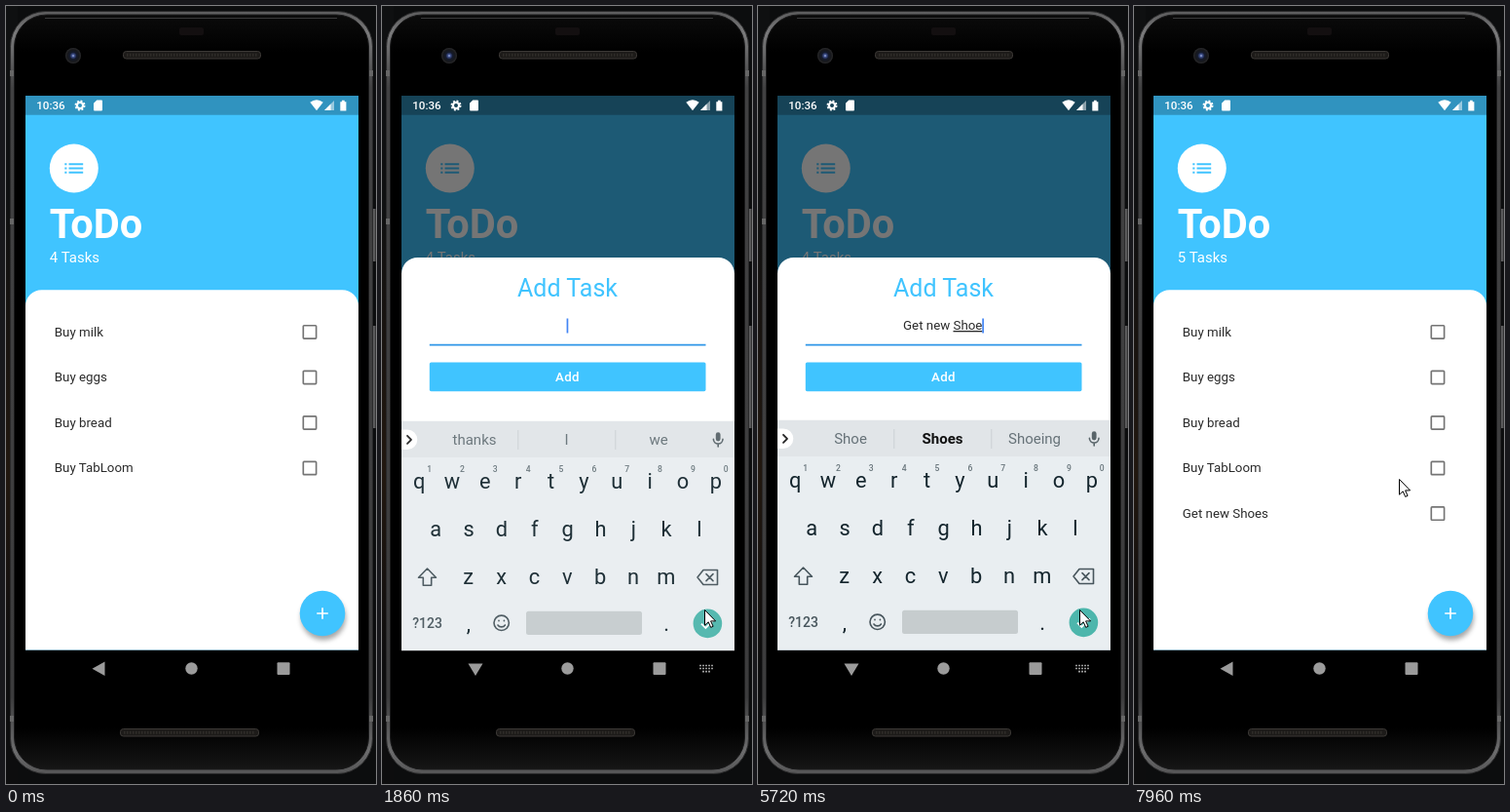
Animation, 380 px wide and 798 px high, one loop 8000 ms. Source, as an HTML page:

```html
<!DOCTYPE html>
<html lang="en">
<head>
<meta charset="utf-8">
<title>ToDo</title>
<style>
  html, body { margin: 0; width: 100%; height: 100%; overflow: hidden; background: #0b0c0d; }
  svg { display: block; width: 380px; height: 798px; font-family: Roboto, sans-serif; }
  text { white-space: pre; }
  .mid { text-anchor: middle; }
  .body { font-size: 13.3px; fill: #2b2b2b; }
  .key { font-size: 21.8px; fill: #14252d; }
  .hint { font-size: 8.6px; font-weight: 500; fill: #68757b; }
  .word { font-size: 15px; fill: #667278; }
  .line { fill: none; stroke: #47555c; stroke-width: 1.6; stroke-linecap: round; stroke-linejoin: round; }
  .u { text-decoration: underline; text-decoration-thickness: 1px; }
</style>
</head>
<body>
<svg viewBox="0 0 380 798">
  <defs>
    <linearGradient id="wall" x2="0" y2="1">
      <stop offset=".25" stop-color="#0f1011"/>
      <stop offset=".6" stop-color="#21170f"/>
      <stop offset=".85" stop-color="#0d0d0e"/>
    </linearGradient>
    <linearGradient id="rim" x2="0" y2="1">
      <stop offset="0" stop-color="#5c5c5d"/>
      <stop offset=".03" stop-color="#7a7a7b"/>
      <stop offset=".1" stop-color="#414142"/>
      <stop offset=".9" stop-color="#3c3c3d"/>
      <stop offset=".97" stop-color="#6c6c6d"/>
      <stop offset="1" stop-color="#555556"/>
    </linearGradient>
    <linearGradient id="glass" x2="0" y2="1">
      <stop offset="0" stop-color="#0b0b0b"/>
      <stop offset=".05" stop-color="#000"/>
      <stop offset=".945" stop-color="#000"/>
      <stop offset="1" stop-color="#161616"/>
    </linearGradient>
    <radialGradient id="lens">
      <stop offset="0" stop-color="#a9b8e6"/>
      <stop offset=".2" stop-color="#3b4c86"/>
      <stop offset=".45" stop-color="#141a2c"/>
      <stop offset=".75" stop-color="#17181b"/>
      <stop offset="1" stop-color="#2c2c2e"/>
    </radialGradient>
    <filter id="soft" x="-40%" y="-40%" width="180%" height="180%"><feGaussianBlur stdDeviation="2.4"/></filter>
    <clipPath id="screen"><path d="M20 92H362V660.5H20z"/></clipPath>
  </defs>

  <!-- phone -->
  <path fill="#0c0d0e" d="M0 0H380V798H0z"/>
  <path fill="url(#wall)" d="M0 0H12V798H0z"/>
  <path fill="#5a5a5b" d="M376 208h3.5v54h-3.5zM376 328h3.5v105h-3.5z"/>
  <rect x="4.5" y="5.5" width="372" height="782" rx="36" fill="url(#rim)" stroke="#2a2a2b"/>
  <rect x="8.5" y="9" width="364" height="774" rx="33" fill="url(#glass)" stroke="#1a1a1b"/>
  <path d="M40 12.5H340" stroke="#3a3a3b"/>
  <path d="M4 66h4v6h-4zM373 66h4v6h-4zM4 218h4v6h-4zM4 728h4v6h-4zM373 728h4v6h-4z" fill="#666"/>
  <rect x="178" y="22" width="25" height="8" rx="2" fill="#130f10"/>
  <circle cx="69" cy="51" r="8" fill="url(#lens)"/>
  <g fill="#1d1b19" stroke="#3c3936">
    <rect x="120.5" y="46.5" width="141" height="7.5" rx="3"/>
    <rect x="117.5" y="741.5" width="142" height="7.5" rx="3"/>
  </g>
  <path d="M124 50.3H258M121 745.3H256" stroke="#2f2c29" stroke-width="3" stroke-dasharray="1.5 1.5"/>

  <g clip-path="url(#screen)">
    <!-- list page -->
    <path fill="#40c4ff" d="M20 92H362V661H20z"/>
    <path fill="#3093bf" d="M20 92H362V111.8H20z"/>
    <circle cx="69.8" cy="166.5" r="25" fill="#fff"/>
    <path d="M60.3 162.3h2.1M64.5 162.3H79.2M60.3 166.5h2.1M64.5 166.5H79.2M60.3 170.7h2.1M64.5 170.7H79.2" stroke="#40c4ff" stroke-width="2.1"/>
    <text x="44.8" y="238" font-size="41.6" font-weight="700" fill="#fff">ToDo</text>
    <text id="count" x="44.8" y="263" font-size="15" fill="#fff"></text>
    <path fill="#fff" d="M20 661V307.8a16.6 16.6 0 0 1 16.6-16.6H345.4A16.6 16.6 0 0 1 362 307.8V661z"/>
    <g id="tasks"></g>
    <circle cx="326" cy="627.5" r="23" fill="#000" opacity=".34" filter="url(#soft)"/>
    <circle cx="325" cy="623" r="23.3" fill="#40c4ff"/>
    <path d="M319.2 623h11.6M325 617.2v11.6" stroke="#fff" stroke-width="1.7"/>
    <path id="dim" d="M20 92H362V661H20z"/>

    <!-- status bar -->
    <text x="31.2" y="106.3" font-size="11.65" font-weight="500" fill="#fff">10:36</text>
    <g fill="none" stroke="#fff">
      <circle cx="76" cy="102" r="3.1" stroke-width="2.2"/>
      <circle cx="76" cy="102" r="4.6" stroke-width="1.8" stroke-dasharray="1.9 1.713"/>
    </g>
    <path fill="#fff" d="M93.3 96.5H98a1 1 0 0 1 1 1v9a1 1 0 0 1-1 1h-7a1 1 0 0 1-1-1V99.8zM312.3 98.8Q319 93.8 325.7 98.8L319 107.3zM333.5 100.5V107H327zM343.3 98.2h1.6v-1.4h2.8v1.4h1.7v9.2h-6.1z"/>
    <path fill="#fff" opacity=".5" d="M337 97V107H327z"/>

    <!-- bottom sheet -->
    <g id="sheet">
      <path fill="#fff" d="M20 960V274.6A16.6 16.6 0 0 1 36.6 258H345.4A16.6 16.6 0 0 1 362 274.6V960z"/>
      <text class="mid" x="190.5" y="298" font-size="25" fill="#40c4ff">Add Task</text>
      <text id="field" class="body" y="332"><tspan id="plain"></tspan><tspan id="under" class="u"></tspan></text>
      <rect id="caret" y="320.5" width="1.7" height="15" fill="#4285f4"/>
      <path d="M48.8 347.7H332.5" stroke="#2f96e8" stroke-width="1.7"/>
      <rect x="48.8" y="365.4" width="283.7" height="29.8" rx="1.7" fill="#40c4ff"/>
      <text class="mid" x="190.5" y="385" font-size="13.3" font-weight="500" letter-spacing=".4" fill="#fff">Add</text>
    </g>
  </g>

  <!-- navigation -->
  <g fill="#9b9b9b">
    <path id="back" d="M101.5 672.5V687L88.5 679.7z"/>
    <g id="hide">
      <path d="M88.5 674.5H103.5L96 687z"/>
      <path d="M326 676.5H340M326 679.5H340M329 682.7H337" stroke="#9b9b9b" stroke-width="1.7" stroke-dasharray="2 1"/>
    </g>
    <circle cx="190.5" cy="679.5" r="6.2"/>
    <rect x="278.5" y="673.3" width="13" height="12.7" rx="1"/>
  </g>

  <!-- keyboard -->
  <g id="board">
    <path fill="#e9eef1" d="M20 462H362V660.3H20z"/>
    <path fill="#e1e5e8" d="M20 424.7H362V462H20z"/>
    <path fill="#fff" d="M20 433.5h6a10.3 10.3 0 0 1 0 20.6h-6z"/>
    <path class="line" d="M26 439.8l4 4-4 4" style="stroke:#222;stroke-width:1.8"/>
    <path d="M139.8 434v20M239.8 434v20" stroke="#cbd1d4"/>
    <g id="words"></g>
    <rect x="342.8" y="436.3" width="4.8" height="9.2" rx="2.4" fill="#59656a"/>
    <path class="line" d="M340.4 443.2a4.8 4.8 0 0 0 9.6 0M345.2 448v3" style="stroke:#59656a"/>
    <g id="keys"></g>
    <path class="line" d="M46.5 576l-9 9.3h4.8v8h8.4v-8h4.8z"/>
    <path class="line" d="M330 577.5H344.5V592.5H330L324 585zM333 581.6l7 7M340 581.6l-7 7"/>
    <text class="mid" x="46.5" y="637" font-size="14" font-weight="500" fill="#47555c">?123</text>
    <text class="mid key" x="89" y="640" font-size="19">,</text>
    <circle class="line" cx="122.7" cy="631.8" r="7.7"/>
    <path class="line" d="M119 634a4.2 3.6 0 0 0 7.4 0M120 629.3v.4M125.4 629.3v.4"/>
    <rect x="148" y="619.7" width="119" height="24.4" rx="2.5" fill="#c6ccce"/>
    <text class="mid key" x="292" y="640">.</text>
    <circle cx="334.4" cy="632.4" r="14.8" fill="#4db6ac"/>
    <path d="M328 632.6l4.4 4.3 8.6-8.6" fill="none" stroke="#fff" stroke-width="1.9"/>
  </g>

  <path id="mouse" d="M.5.5V16.2L4.2 12.8 6.7 18.4 9.1 17.3 6.6 11.9H11.6z" fill="#fff" stroke="#000"/>
</svg>
<script>
const LOOP = 8000;
const $ = id => document.getElementById(id);

function make(tag, attrs, parent, content = '') {
  const el = document.createElementNS('http://www.w3.org/2000/svg', tag);
  for (const k in attrs) el.setAttribute(k, attrs[k]);
  el.textContent = content;
  parent.append(el);
  return el;
}

const rows = ['Buy milk', 'Buy eggs', 'Buy bread', 'Buy TabLoom', 'Get new Shoes'].map((name, i) => {
  const y = 334.4 + i * 46.55;
  const g = make('g', {}, $('tasks'));
  make('text', { class: 'body', x: 49.8, y: y + 4.3 }, g, name);
  make('rect', { x: 305.3, y: y - 6.65, width: 13.3, height: 13.3, rx: 0.8,
                 fill: 'none', stroke: '#757575', 'stroke-width': 1.66 }, g);
  return g;
});

[['qwertyuiop', 38.2, 494], ['asdfghjkl', 55.2, 542.5], ['zxcvbnm', 88.7, 592]].forEach(([keys, x, y], r) => {
  [...keys].forEach((c, i) => {
    const cx = x + i * 33.85;
    make('text', { class: 'key mid', x: cx, y }, $('keys'), c);
    if (!r) make('text', { class: 'hint mid', x: cx + 10.4, y: 477.3 }, $('keys'), (i + 1) % 10);
  });
});

const words = [95, 189.5, 284].map(x => make('text', { class: 'word mid', x, y: 449.3 }, $('words')));

// time, finished words, word being typed, suggestions
const typing = [
  [0, '', '', 'thanks,I,we'],
  [3250, '', 'G', 'G,Good,Go'],
  [3360, '', 'Ge', 'Ge,Get,Getting'],
  [3470, '', 'Get', 'Get,Gets,Getting'],
  [3580, '', 'Get', 'Get,Get a,Getting'],
  [3800, 'Get ', '', 'the,a,it'],
  [4020, 'Get ', 'n', 'n,new,no'],
  [4130, 'Get ', 'ne', 'ne,new,next'],
  [4250, 'Get ', 'new', 'new,new ones,new one'],
  [4470, 'Get new ', '', 'ones,one,and'],
  [4930, 'Get new ', 'S', 'S,So,She'],
  [5040, 'Get new ', 'Sh', 'Sh,She,Should'],
  [5260, 'Get new ', 'Sho', 'Sho,Show,Should'],
  [5720, 'Get new ', 'Shoe', 'Shoe,*Shoes,Shoeing'],
  [5850, 'Get new ', 'Shoes', 'Shoes,Shoe,'],
  [7030, 'Get new Shoes', '', 'Shoes,Shoe,']
];

// time, dim, sheet offset, keyboard offset, keyboard opacity
const poses = [
  [0, 0, 420, 0, 0],
  [1740, .3, 150, 28, .5],
  [1860, .54, 0, 1, .95],
  [1980, .54, 0, 0, 1],
  [7030, .315, 285, 4.3, .89],
  [7150, .08, 375, 28, .3],
  [7270, 0, 420, 0, 0]
];

// start, end, steps, target x, target y
const moves = [
  [370, 940, 6, 336, 637],
  [1860, 1860, 1, 331, 619],
  [2330, 2330, 1, 330, 619],
  [6090, 6570, 5, 175, 396],
  [6690, 6810, 2, 206, 377],
  [7390, 7390, 1, 193, 390],
  [7610, 7960, 4, 272, 485]
];

const latest = (list, t) => list.filter(s => s[0] <= t).pop();
const between = (t, a, b) => t >= a && t < b;
const show = (el, on) => { el.style.display = on ? '' : 'none'; };
const shift = (el, x, y) => el.setAttribute('transform', `translate(${x} ${y})`);

function mouseAt(t) {
  let x = 380, y = 716;
  for (const [a, b, n, tx, ty] of moves) {
    if (t < a) break;
    const done = n > 1 ? Math.min(n, Math.floor((t - a) / (b - a) * (n - 1) + 1e-6) + 1) : 1;
    x += (tx - x) * done / n;
    y += (ty - y) * done / n;
  }
  return [Math.round(x), Math.round(y)];
}

let shown;
function drawText(step) {
  if (step === shown) return;
  shown = step;
  const [, before, word, hints] = step;
  $('plain').textContent = before;
  $('under').textContent = word;
  const w = before || word ? $('field').getComputedTextLength() : 0;
  $('field').setAttribute('x', 189.7 - w / 2);
  $('caret').setAttribute('x', 189.6 + w / 2);
  hints.split(',').forEach((h, i) => {
    const bold = h[0] === '*';
    words[i].textContent = bold ? h.slice(1) : h;
    words[i].style.fontWeight = bold ? 700 : 400;
    words[i].style.fill = bold ? '#111' : '';
  });
}

function render(t) {
  const added = t >= 7030;
  $('count').textContent = (added ? 5 : 4) + ' Tasks';
  show(rows[4], added);

  const [, dim, sheetY, boardY, alpha] = latest(poses, t);
  $('dim').style.opacity = dim;
  shift($('sheet'), 0, sheetY);
  shift($('board'), 0, boardY);
  $('board').style.opacity = alpha;

  drawText(latest(typing, t));
  show($('caret'), !added && !between(t, 2330, 2790) && !between(t, 6330, 6810));

  const open = between(t, 1620, 7030);
  show($('hide'), open);
  show($('back'), !open);

  show($('mouse'), t >= 370);
  shift($('mouse'), ...mouseAt(t));
}

const start = performance.now();
function tick() {
  render((performance.now() - start) % LOOP);
  requestAnimationFrame(tick);
}
tick();
</script>
</body>
</html>
```
